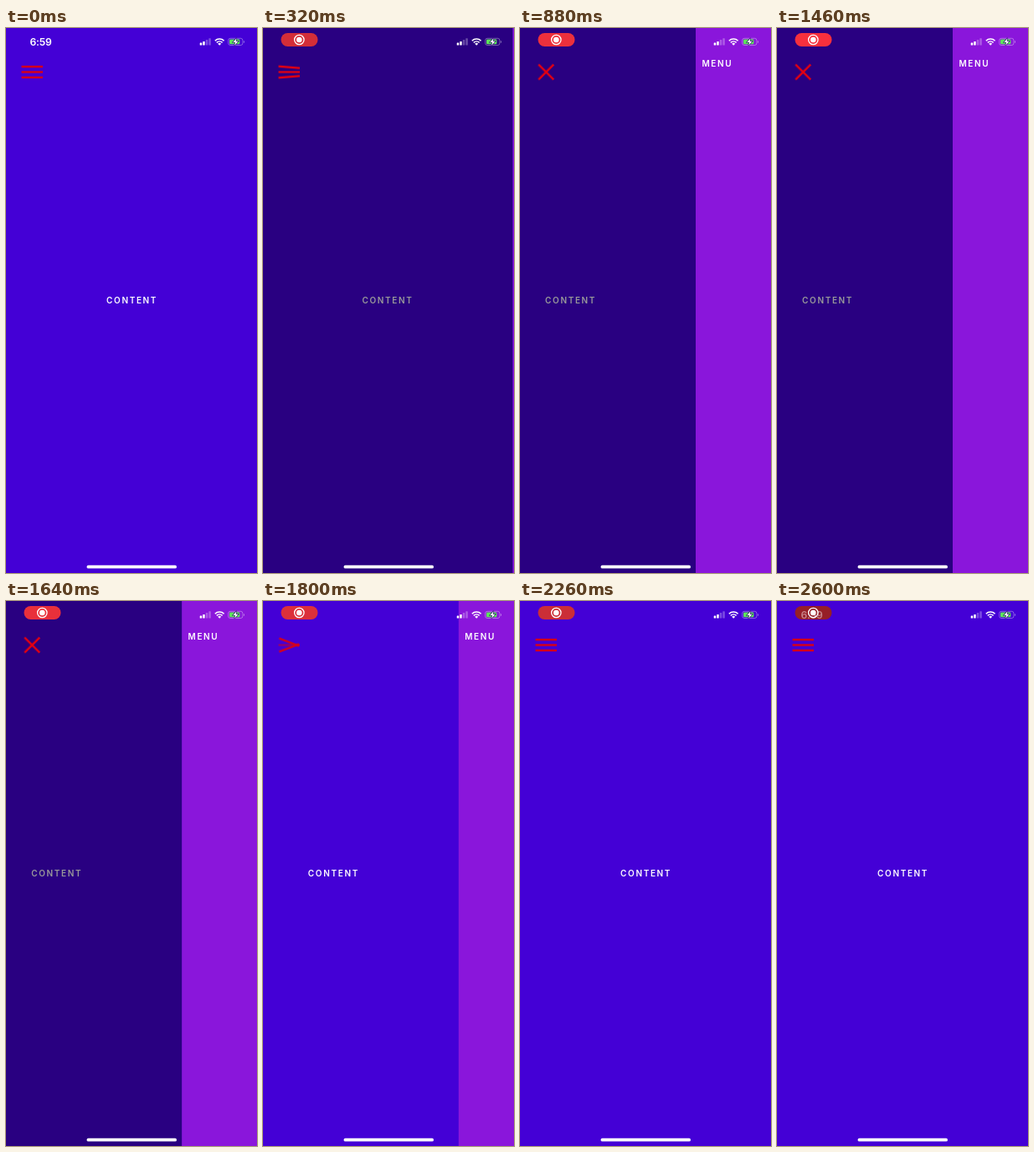
An HTML page for the animation above (2.62 s loop, 300 px wide and 649 px high).

```html
<!DOCTYPE html>
<html lang="en">
<head>
<meta charset="utf-8">
<title>Side menu</title>
<style>
  :root {
    --loop: 2620ms;
    /* damped spring, 500 ms long */
    --spring: linear(0, .06, .197, .364, .53, .677, .797, .889, .954, .996, 1.021,
      1.032, 1.037, 1.036, 1.03, 1.024, 1.017, 1.012, 1.007, 1.004, 1);
  }
  html, body { margin: 0; width: 100%; height: 100%; overflow: hidden; background: #4400d6; }
  svg { display: block; width: 100vw; height: 100vh; }
  text { font-family: Inter, Roboto, sans-serif; font-weight: 600; fill: #fff; }
  .label { font-size: 10px; letter-spacing: 1.65px; }
  .time { font-size: 12.2px; letter-spacing: -.2px; }

  .drawer, .shade, .pill, .record, .time { animation: var(--loop) linear infinite; }
  .drawer { animation-name: slide; }
  .shade { animation-name: shade; }
  .record { animation-name: appear; }
  .pill { animation-name: pulse; }
  .time { animation-name: clock; }

  .bar {
    fill: #d4001c;
    transform-box: fill-box;
    transform-origin: center;
    animation: var(--loop) var(--spring) infinite;
    animation-name: cross, tint;
  }
  .top { --y: 6.4px; --turn: 45deg; }
  .bottom { --y: -6.4px; --turn: -45deg; }
  .middle { animation-name: vanish, tint; }

  @keyframes slide {
    0%, 10.84% { transform: translateX(0); animation-timing-function: ease-in; }
    20.382% { transform: translateX(-45px); animation-timing-function: ease-out; }
    29.924% { transform: translateX(-90px); }
    62.252% { transform: translateX(-90px); animation-timing-function: ease-in; }
    71.794% { transform: translateX(-45px); animation-timing-function: ease-out; }
    81.336%, 100% { transform: translateX(0); }
  }
  @keyframes shade {
    0% { opacity: 0; animation-timing-function: step-end; }
    11.26% { opacity: .4; animation-timing-function: step-end; }
    63.36%, 100% { opacity: 0; }
  }
  @keyframes tint {
    0% { fill: #d4001c; animation-timing-function: step-end; }
    11.26% { fill: #e6000e; animation-timing-function: step-end; }
    63.36%, 100% { fill: #d4001c; }
  }
  /* the spring eases every step of these two */
  @keyframes cross {
    0%, 10.992%, 83.969%, 100% { transform: translateY(0) rotate(0deg); }
    30.076%, 64.885% { transform: translateY(var(--y)) rotate(var(--turn)); }
  }
  @keyframes vanish {
    0%, 10.992%, 83.969%, 100% { opacity: 1; }
    30.076%, 64.885% { opacity: 0; }
  }
  @keyframes appear {
    0% { opacity: 0; animation-timing-function: step-end; }
    11.26%, 100% { opacity: 1; }
  }
  @keyframes pulse {
    0%, 12.2% { fill: #d32e38; }
    22.1% { fill: #dd303a; }
    35% { fill: #ee303c; }
    48% { fill: #fb303e; }
    55.7% { fill: #f7303d; }
    68.7% { fill: #dc303a; }
    77.1% { fill: #d03038; }
    93.9% { fill: #c72d36; }
    99.2%, 100% { fill: #961f27; }
  }
  @keyframes clock {
    0% { opacity: 1; animation-timing-function: step-end; }
    11.26%, 93.9% { opacity: 0; }
    99.2%, 100% { opacity: .45; }
  }
</style>
</head>
<body>
<svg viewBox="0 0 300 649">
  <g class="drawer">
    <rect x="-2" width="392" height="649" fill="#4400d6"/>
    <rect x="300" width="92" height="649" fill="#8a16db"/>
    <text class="label" x="150.6" y="328.2" text-anchor="middle">CONTENT</text>
    <text class="label" x="307.4" y="46.2">MENU</text>
    <rect class="shade" width="300" height="649"/>
  </g>

  <rect class="bar top" x="18.5" y="44.8" width="25.5" height="2.5"/>
  <rect class="bar middle" x="18.5" y="51.2" width="25.5" height="2.5"/>
  <rect class="bar bottom" x="18.5" y="57.6" width="25.5" height="2.5"/>

  <g class="record">
    <rect class="pill" x="21.5" y="6" width="44" height="16" rx="8"/>
  </g>
  <text class="time" x="41.5" y="21" text-anchor="middle">6:59</text>
  <g class="record">
    <circle cx="43.3" cy="14" r="5.7" fill="none" stroke="#fff" stroke-width="1.3"/>
    <circle cx="43.3" cy="14" r="3.3" fill="#fff"/>
  </g>

  <g fill="#fff">
    <rect x="231.7" y="17.4" width="2.5" height="3.2" rx=".6"/>
    <rect x="235.2" y="15.9" width="2.5" height="4.7" rx=".6"/>
    <g opacity=".3">
      <rect x="238.8" y="14" width="2.5" height="6.6" rx=".6"/>
      <rect x="242.3" y="12.2" width="2.5" height="8.4" rx=".6"/>
    </g>
    <path d="M255.2 20.8l-2-2.1a2.9 2.9 0 0 1 4 0z"/>
  </g>
  <g fill="none" stroke="#fff" stroke-width="1.6">
    <path d="M249.8 15.2a7.7 7.7 0 0 1 10.8 0"/>
    <path d="M251.8 17.3a4.9 4.9 0 0 1 6.8 0"/>
  </g>
  <g>
    <rect x="265.7" y="12.3" width="17.2" height="8.2" rx="2.4" fill="none" stroke="#fff" stroke-opacity=".4" stroke-width=".9"/>
    <path d="M284 15v2.9q1-.4 1-1.45T284 15z" fill="#fff" opacity=".45"/>
    <rect x="267" y="13.5" width="12.4" height="5.8" rx="1.3" fill="#5ee35c"/>
    <path d="M275.6 11.9l-4.2 5h2.7l-1 4 4.4-5.2h-2.8z" fill="#fff" stroke="#26106a" stroke-width="1.3" paint-order="stroke"/>
  </g>

  <rect x="96.5" y="639.8" width="107.5" height="3.8" rx="1.9" fill="#fff"/>
</svg>
</body>
</html>
```
